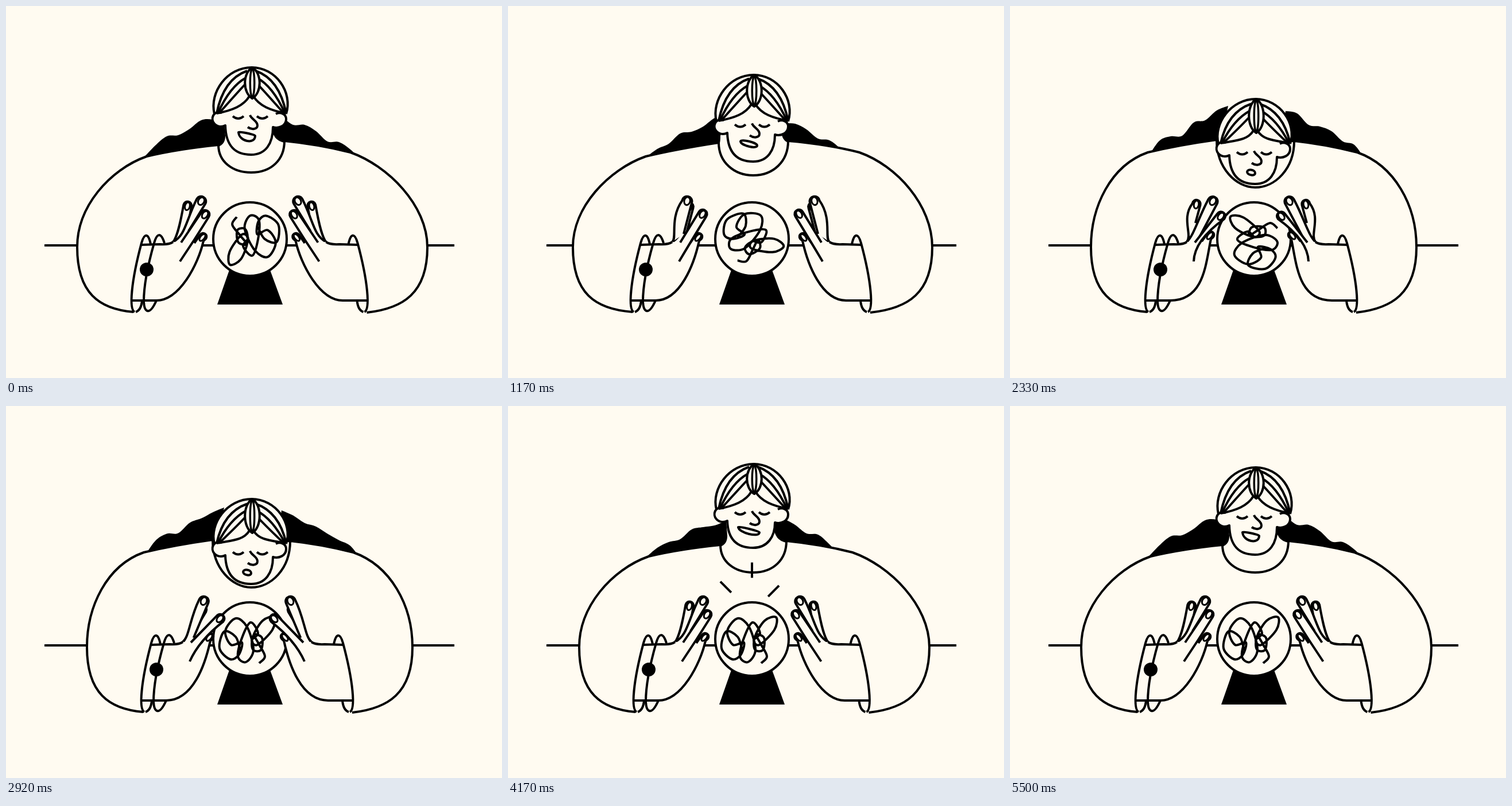
Write an HTML page with a canvas that moves like this. It is 864 px wide and 648 px high and loops after 5580 ms.

```html
<!DOCTYPE html>
<html lang="en">
<head>
<meta charset="utf-8">
<title>Crystal ball</title>
<style>
html, body { margin: 0; width: 100%; height: 100%; overflow: hidden; background: #fffbf1; }
canvas { display: block; }
</style>
</head>
<body>
<canvas id="stage" width="864" height="648"></canvas>
<script>
const ctx = document.getElementById('stage').getContext('2d');
const LOOP = 5580, STEPS = 67, STEP = LOOP / STEPS;
const PAPER = '#fffbf1', INK = '#000';

// Body: left, right, cuff shift, neck x, neck y, collar bottom, shoulder x, y, right shoulder x, hair inset
const bodyRest = [124, 734, 0, 370, 242, 290, 245, 262, 600, 12];
const bodyWide = [100, 752, -11, 369, 242, 290, 234, 264, 618, 10];
const bodyLean = [113, 739, -5, 367, 238, 295, 240, 262, 612, 3];
const bodyLow = [136.5, 712, 14, 360, 233, 313, 240, 254, 602, 9];
const bodyDeep = [141, 708, 17, 360, 233, 316, 240, 255, 605, 9];
const bodyKeys = [[0, bodyRest], [640, bodyWide], [1170, bodyLean], [1830, bodyLow], [2330, bodyDeep],
  [3580, bodyDeep], [4080, bodyRest], [LOOP, bodyRest]];

// Head: shifts of top, parting, face, jaw, ears; mouth left, right, upper and lower bulge
const headRest = [0, 0, 0, 0, 0, 405, 220, 434, 226, 2, 16];
const headLean = [13, 14, 14.5, 12, 13, 405, 236, 434, 243, 5, 7];
const headLow = [50, 52, 55.5, 48, 48, 411, 280, 429, 284, 7, 7];
const headDeep = [55, 60, 62.5, 51, 52, 413, 289, 427, 291, 6, 6];
const headHigh = [-6, -8, -7, -12, -8, 401, 211, 438, 220, 2, 10];
const headKeys = [[0, headRest], [670, headHigh], [1170, headLean], [1830, headLow], [2330, headDeep],
  [3580, headDeep], [4140, headHigh], [4250, headHigh], [4900, headRest], [LOOP, headRest]];

// Heights of the hair edge every 20 px, left lock then right lock
const hairRest = [243, 227, 225, 214, 199, 198, 205, 192, 207, 207, 218, 236, 237, 250];
const hairLean = [249, 240, 222, 219, 210, 195, 190, 205, 205, 215, 231, 234, 250, 275];
const hairLow = [246, 226, 221, 211, 197, 197, 195, 185, 203, 206, 215, 233, 238, 250];
const hairDeep = [235, 227, 226, 203, 199, 182, 174, 183, 187, 207, 210, 218, 236, 242];
const hairBack = [235, 217, 216, 204, 192, 189, 180, 180, 195, 200, 210, 228, 231, 246];
const hairHigh = [247, 237, 232, 215, 211, 208, 200, 196, 207, 222, 224, 241, 262, 280];
const hairKeys = [[0, hairRest], [1170, hairLean], [1830, hairLow], [2330, hairDeep],
  [3580, hairBack], [4170, hairHigh], [5500, hairRest], [LOOP, hairRest]];

// Hand: two curved fingers (two controls, tip, end), third tip and bend, little tip, palm curve
const handFlat = [300, 400, 306, 365, 318, 341, 320, 366,
  312, 400, 312, 378, 344, 333, 318, 392, 351, 357, 328, 347, 397, 302];
const handUp = [311, 400, 316, 365, 323, 343, 314, 403,
  300, 405, 286, 370, 319, 332, 311, 397, 348, 356, 325, 341, 397, 305];
const handSpread = [301, 398, 281, 370, 309, 338, 306, 378,
  304, 398, 310, 372, 340, 333, 308, 412, 355, 360, 304, 336, 394, 322];
const handReach = [305, 400, 328, 370, 342, 356, 311, 408,
  301, 405, 298, 370, 324, 332, 311, 398, 365, 368, 330, 346, 399, 300];
const handKeys = [[0, handFlat], [500, handFlat], [1170, handUp], [1830, handSpread], [2420, handSpread],
  [3300, handReach], [3580, handReach], [4080, handFlat], [LOOP, handFlat]];

// One tangled line, shown at four turns for two steps each
const tangle = [441, 448, 451, 436, 440, 414, 432, 398, 446, 404, 444, 425, 430, 424, 430, 402, 447, 374,
  467, 368, 464, 390, 438, 416, 428, 408, 439, 396, 426, 377, 411, 404, 404, 436, 418, 446, 431, 425,
  420, 385, 400, 370, 382, 392, 392, 416, 411, 412, 405, 434, 390, 441, 372, 422, 380, 393, 400, 402, 408, 425];
const turns = [170, 0, 266, 55];

function track(keys, t) {
  let i = 0;
  while (i < keys.length - 2 && t >= keys[i + 1][0]) i++;
  const [t0, a] = keys[i], [t1, b] = keys[i + 1];
  const u = Math.min(1, Math.max(0, (t - t0) / (t1 - t0)));
  const e = u * u * (3 - 2 * u);
  return a.map((v, k) => v + (b[k] - v) * e);
}

function draw(d, fill, stroke = 4) {
  const p = new Path2D(d);
  if (fill) { ctx.fillStyle = fill; ctx.fill(p); }
  if (stroke) { ctx.lineWidth = stroke; ctx.stroke(p); }
}

function spline(p) {
  const n = p.length, at = i => p[i < 0 ? i + 2 : i >= n ? i - 2 : i];
  const out = k => at(k) + (at(k + 2) - at(k - 2)) / 6;
  const into = k => at(k + 2) - (at(k + 4) - at(k)) / 6;
  let d = `M${p[0]},${p[1]}`;
  for (let i = 0; i < n - 2; i += 2)
    d += `C${out(i)},${out(i + 1)} ${into(i)},${into(i + 1)} ${p[i + 2]},${p[i + 3]}`;
  return d;
}

function disc(x, y, r, fill) {
  ctx.beginPath();
  ctx.arc(x, y, r, 0, 7);
  ctx.fillStyle = fill;
  ctx.fill();
}

function hair(h, b) {
  const lock = (x, ys) => spline(ys.flatMap((y, i) => [x + i * 20, y]));
  const [nx, ny] = [b[3], b[4]], l = nx + b[9], r = 845 - l;
  draw(lock(240, [264, ...h.slice(0, 7)]) + `L${l},226Q${l},241 ${nx},${ny + 3}L240,285Z`, INK, 0);
  draw(lock(480, [...h.slice(7), 270]) + `L620,290L${855 - nx},238Q${r},234 ${r},208Z`, INK, 0);
}

const mirrorSum = shift => 848.5 - Math.abs(shift) / 2;

function body([L, R, shift, nx, ny, low, sx, sy, rx]) {
  const lc = 222 + shift, rc = mirrorSum(shift) - lc + 2;
  const mx = 855 - nx, my = 235, ry = 255, mid = 427;
  draw(`M${lc},533C${L + 38},528 ${L},500 ${L},420C${L},350 ${sx - 65},${sy + 23} ${sx},${sy}` +
    `Q${sx + 55},${sy - 13} ${nx},${ny}` +
    `C${nx},${ny + (low - ny) * 0.6} ${mid - 33},${low} ${mid},${low}` +
    `C${mid + 35},${low} ${mx},${my + (low - my) * 0.6} ${mx},${my}` +
    `Q${rx - 55},${ry - 14} ${rx},${ry}` +
    `C${rx + 65},${ry + 23} ${R},${ry + 92} ${R},420C${R},500 ${R - 42},527 ${rc},534`, PAPER);
}

function head([t, p, f, j, e, lx, ly, rx, ry, up, down]) {
  draw(`M363,${188 + e}C354,${150 + t} 385,${107 + t} 428,${107 + t}` +
    `C470,${107 + t} 500,${150 + t} 488,${188 + e}`, PAPER);
  draw(`M376,${186 + e}C360,${182 + e} 356,${197 + e} 363,${205 + e}C368,${211 + e} 377,${211 + e} 382,${208 + e}` +
    `C383,${245 + j} 400,${259 + j} 427,${259 + j}C452,${259 + j} 465,${240 + j} 465,${211 + e}` +
    `C475,${214 + e} 488,${209 + e} 488,${197 + e}C488,${188 + e} 478,${184 + e} 470,${188 + e}`, PAPER);

  const m = (t + p) / 2;
  for (const side of [x => x, x => 855 - x]) {
    for (let i = 0; i < 3; i++)
      draw(`M${side(420 - i * 2)},${113 + i * 12 + m}Q${side(379 + i * 11)},${127 + i * 13 + m} ` +
        `${side(367 + i * 2)},${187 + e}`);
    draw(`M${side(424)},${157 + p}C${side(414)},${174 + p} ${side(394)},${182 + e} ${side(367)},${187 + e}`);
  }
  const top = 107 + t, end = 161 + p, a = top + 10, z = end - 10;
  const lens = w => `M429,${top}C${429 - w},${a} ${429 - w},${z} 429,${end}C${429 + w},${z} ${429 + w},${a} 429,${top}`;
  draw(lens(17), PAPER);
  draw(lens(5), null, 3.5);

  for (const x of [395, 437]) draw(`M${x},${192 + f}q9.5,8 19,0`);
  draw(`M425,${190 + f}c3,8 13,10 13,18c0,7 -10,8 -17,3`);
  draw(`M${lx},${ly}C${lx + 1},${ly - up} ${rx},${ry - up} ${rx},${ry}` +
    `C${rx},${ry + down} ${lx + 1},${ly + down} ${lx},${ly}Z`, PAPER);
}

function finger(a, c1, c2, tip, r, bend, b) {
  let dx = tip[0] - (a[0] + b[0]) / 2, dy = tip[1] - (a[1] + b[1]) / 2;
  const len = Math.hypot(dx, dy);
  dx /= len; dy /= len;
  const at = (along, side) => [tip[0] + dx * along + dy * side, tip[1] + dy * along - dx * side];
  const l = at(-r * 1.05, r), q = at(-r * 1.05, -r);
  draw(`M${a}C${c1 || a} ${c2 || l} ${l}C${at(r * 0.35, r)} ${at(r * 0.35, -r)} ${q}Q${bend || b} ${b}`, PAPER);
  ctx.beginPath();
  ctx.ellipse(...at(-8, 0), 7, r * 0.6, Math.atan2(dy, dx), 0, 7);
  ctx.lineWidth = 3;
  ctx.stroke();
}

function hand(h, bracelet) {
  const pt = i => [h[i], h[i + 1]];
  const root = [291, 411], inner = [305, 412], outer = [303, 445];
  const [x, y] = pt(19), little = [x - 19, y + 16], edge = [x - 3, y + 12];
  const wrist = `M236,416L268,415Q284,416 ${root}`;
  const palm = `C${x - 12},${y + 53} ${h[21]},513 262,513L219,513`;
  draw('M226,533C232,531 236,524 237,513');
  finger(root, pt(0), pt(2), pt(4), 7, null, pt(6));
  finger(root, pt(8), pt(10), pt(12), 8.5, null, pt(14));
  draw(`${wrist}L${inner}L${little}L${edge}${palm}Z`, PAPER, 0);
  draw(`${wrist}M${edge}${palm}`);
  finger(little, null, null, [x, y], 6, null, edge);
  finger(inner, null, null, pt(16), 7.5, [h[18], 408], outer);
  draw('M224,533C214,528 218,480 236,413C241,395 248,395 252,415');
  if (!bracelet) return;
  draw('M276,413C270,394 263,395 258,413C246,455 240,490 240,515C241,534 250,540 262,513');
  disc(245, 459, 12, INK);
}

function ball(step) {
  draw('M389,460H460L482,520H368Z', INK, 0);
  disc(425, 406, 64, PAPER);
  ctx.lineWidth = 4;
  ctx.stroke();
  ctx.save();
  ctx.translate(425, 406);
  ctx.rotate(turns[(step >> 1) % 4] * Math.PI / 180);
  ctx.translate(-425, -406);
  draw(spline(tangle));
  ctx.restore();
}

function rays(t) {
  const v = (t - 4000) / 278;
  const out = x => { x = Math.min(1, Math.max(0, x)); return 63 * x * (2 - x); };
  const front = out(v), back = out(v - 0.36);
  if (front - back < 0.5) return;
  const k = Math.SQRT1_2;
  for (const [x, y, dx, dy] of [[425, 325, 0, -1], [407, 343, -k, -k], [435, 350, k, -k]])
    draw(`M${x + dx * back},${y + dy * back}L${x + dx * front},${y + dy * front}`);
}

function render(step) {
  const t = step * STEP;
  const b = track(bodyKeys, t), h = track(handKeys, t), shift = b[2];
  ctx.setTransform(1, 0, 0, 1, 0, 0);
  ctx.fillStyle = PAPER;
  ctx.fillRect(0, 0, 864, 648);
  ctx.strokeStyle = INK;
  ctx.lineJoin = 'round';

  draw('M67,417H781');
  hair(track(hairKeys, t), b);
  body(b);
  head(track(headKeys, t));
  draw('M300,417H550');
  ball(step);
  rays(t);

  ctx.setTransform(1, 0, 0, 1, shift, 0);
  hand(h, true);
  ctx.setTransform(-1, 0, 0, 1, mirrorSum(shift) - shift, 0);
  hand(h, false);
}

function tick() {
  render(Math.floor((performance.now() % LOOP + 4) / STEP) % STEPS);
  requestAnimationFrame(tick);
}
tick();
</script>
</body>
</html>
```
